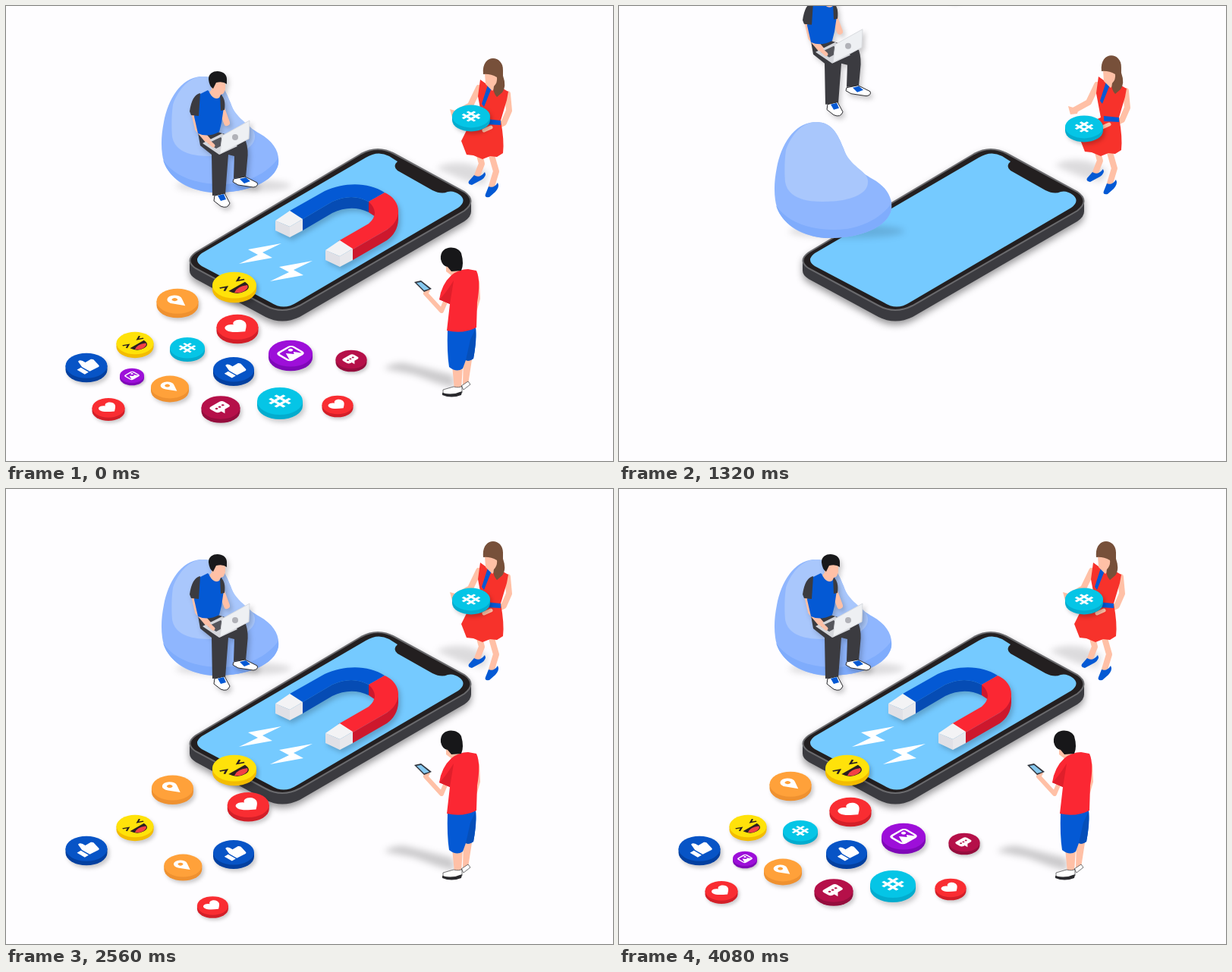
Recreate the animation shown at these times as an HTML page. Size 800 by 600 pixels, loop 4120 ms.

```html
<!DOCTYPE html>
<html lang="en">
<head>
<meta charset="utf-8">
<title>Social magnet</title>
<style>
html, body { margin: 0; width: 100%; height: 100%; overflow: hidden; background: #fefdff }
svg { display: block; width: 800px; height: 600px }
.lift { filter: drop-shadow(3px 4px 3px #0003) }
.soft { filter: blur(4px) }
.skin { fill: #ffc0a6 }
.blue { fill: #0459d4 }
.dark { fill: #3b3b40 }
.red { fill: #fb2733 }
.line { fill: none; stroke: #ffc0a6; stroke-linecap: round; stroke-linejoin: round }
</style>
</head>
<body>
<svg viewBox="0 0 800 600">
<g id="phone" style="filter:drop-shadow(0 5px 5px #0006)">
  <path class="dark" d="M242 335V349Q242 355 250 360L342 410Q364 421 387 410L604 284Q613 278 613 271V256Z"/>
  <path fill="#231f20" stroke="#6a6a6d" stroke-width="2" d="M250 325L468 195Q490 183 512 195L604 245Q621 257 604 270L387 395Q364 407 342 395L250 346Q235 336 250 325Z"/>
  <path fill="#75caff" d="M258 326L474 200Q490 190 505 198L516 205Q509 211 516 217L562 243Q574 249 582 245Q590 243 598 249Q608 257 596 266L383 391Q366 402 349 391L258 343Q246 335 258 326Z"/>
</g>
<g id="chair">
  <ellipse class="soft" cx="300" cy="237" rx="76" ry="9" fill="#0002"/>
  <path fill="#8fb6fe" d="M208 153C214 122 231 94 258 93C280 92 288 108 296 128C303 150 318 158 334 168C352 178 361 192 359 208C354 232 318 246 278 246C240 246 210 226 206 196C204 182 205 168 208 153Z"/>
  <path fill="#7facfc" d="M207 203C224 229 262 238 300 234C330 229 350 214 359 200V208C354 232 318 246 278 246C245 246 214 228 207 203Z"/>
  <path fill="#a9c7fc" d="M220 130C226 112 240 94 258 93C280 92 288 108 296 128C304 152 327 157 328 170C330 192 295 198 268 198C240 198 222 190 219 172C218 160 218 145 220 130Z"/>
</g>
<g id="bolt1" fill="#fff"><path id="zap" d="M363 313L319 321 332 328 307 340 351 332 338 325Z"/></g>
<g id="bolt2" fill="#fff"><use href="#zap" x="41" y="23"/></g>
<g id="magnet" class="lift">
  <path fill="#064cb4" d="M391 281L430 258Q456 246 478 258L487 269 478 272Q455 261 430 273L391 296Z"/>
  <path class="blue" d="M374 270L420 244C446 232 478 232 499 246L478 258Q456 246 430 258L391 281Z"/>
  <path fill="#cd182d" d="M478 258Q492 266 487 278L478 272ZM457 321L502 295Q517 284 517 266V282Q516 299 502 309L457 335Z"/>
  <path class="red" d="M478 258L499 246C523 257 522 282 502 295L457 321 438 310 478 287Q494 273 478 258Z"/>
  <g id="tip">
    <path fill="#f3f3f5" d="M355 283L374 270 391 281 374 291Z"/>
    <path fill="#e0e0e6" d="M355 283L374 291V305L355 296Z"/>
    <path fill="#e8e8ec" d="M374 291L391 281V296L374 305Z"/>
  </g>
  <use href="#tip" x="66" y="39"/>
</g>
<g id="coins"></g>
<g id="sitter" class="lift">
  <path class="dark" d="M253 167L279 166 316 178Q320 190 318 204L316 226 300 227 301 198 293 196 291 222 289 249 272 250 271 196 256 184Z"/>
  <path fill="#fff" stroke="#2a2a2e" d="M275 250L288 247 295 260Q292 268 283 264L274 257ZM300 228L315 225 331 233Q333 238 326 239L306 236 299 232Z"/>
  <path class="blue" d="M279 250L287 248 290 255 283 257ZM308 228L316 226 322 231 314 234Z"/>
  <path class="line" stroke-width="8" d="M248 140L253 162 270 182M284 135L291 154"/>
  <path class="blue" d="M250 119L266 111Q276 124 284 114L287 134 284 154 281 166Q266 174 253 168L248 146Z"/>
  <path class="dark" d="M256 115Q245 117 242 139L244 144 254 145ZM282 116Q290 121 288 137L283 138Z"/>
  <path class="skin" d="M271 98H289V109Q288 116 283 117L281 121Q274 125 268 114L271 110Z"/>
  <path fill="#19191b" d="M267 97C266 82 291 83 291 96V103Q286 99 277 101L273 109Q268 106 267 97Z"/>
  <path fill="#d4d6db" d="M259 181L285 168 305 185 281 196Z"/>
  <path fill="#55565c" d="M266 181L283 173 290 181 277 188Z"/>
  <path class="line" stroke-width="5" d="M263 175L273 184"/>
  <path fill="#eef0f3" stroke="#d8dade" d="M285 171L321 151 320 175 282 195Z"/>
  <circle cx="302" cy="173" r="4" fill="#b1b2b8"/>
</g>
<g id="woman">
  <path class="soft" fill="#0002" d="M567 214Q585 203 613 209L636 220 630 236 604 230Z"/>
  <path class="line" stroke-width="8" d="M624 197L627 208 620 226M640 197L646 218 640 238"/>
  <path class="blue" d="M617 223Q624 228 631 219Q634 224 627 229L614 236Q608 235 610 231ZM636 238Q643 241 648 233Q651 238 645 245L637 252Q630 253 632 248Z"/>
  <path class="line" stroke-width="8" d="M623 108L612 131 592 142M661 116L663 138 656 154 640 161"/>
  <path class="skin" d="M585 136L592 138 600 135 597 146 588 147Z"/>
  <path fill="#f7322b" d="M625 97L636 105 650 106 662 113 660 124 652 151Q657 178 655 194L647 199 638 198 628 202 616 197 607 196 600 178 609 160 628 151 622 119Z"/>
  <path class="blue" d="M635 104L640 108 630 133 627 129ZM632 149L652 151V157L632 156Z"/>
  <path class="skin" d="M631 88H648V104L641 112 632 103Z"/>
  <path fill="#77503a" d="M629 90C626 62 656 64 655 85L655 92Q660 106 654 114L647 120Q641 113 643 106Q648 101 647 94Q638 89 629 90Z"/>
  <path class="line" stroke-width="5" d="M639 160L630 164"/>
</g>
<g id="held"></g>
<g id="man">
  <path class="soft" fill="#0003" d="M498 478Q516 466 535 473L590 487 592 504 570 498 538 486Z"/>
  <path class="skin" d="M588 474H602L600 506H591ZM603 460H615L609 499H602Z"/>
  <path fill="#fff" stroke="#38383c" stroke-width=".7" d="M576 506L590 502Q598 504 601 501L601 510 590 514 576 511ZM600 501L609 495 612 499 603 506Z"/>
  <path fill="#29292d" d="M575 510Q588 514 601 508L600 513Q587 518 575 513Z"/>
  <path class="blue" d="M582 426L619 424Q621 438 616 465Q611 469 606 467L602 478Q594 484 584 476Q581 457 582 426Z"/>
  <path fill="#064fb9" d="M612 440L606 467Q611 469 616 465Q620 445 619 425Z"/>
  <path class="line" stroke-width="6" d="M621 364L622 386 618 400M579 390L574 402 553 379"/>
  <path class="skin" d="M580 335L598 342 600 354 588 356 580 350ZM544 369L552 367 559 375 555 382Z"/>
  <path fill="#30343d" d="M538 364L547 362 561 373 551 377Z"/>
  <path fill="#86c8ef" d="M541 365L547 364 558 373 551 375Z"/>
  <path class="red" d="M587 355Q597 347 609 347L620 349Q626 362 621 391L620 424Q602 433 581 428L585 393 571 387Q574 367 587 355Z"/>
  <path fill="#e01f2b" d="M590 362L585 393 571 387Q578 381 590 362Z"/>
  <path fill="#171719" d="M573 334C571 315 595 315 600 326Q604 340 600 349L587 350 582 344Q575 343 573 334Z"/>
</g>
</svg>
<script>
const LOOP = 4120, START = 840, SPAN = 480, FPS_STEP = 40;
const $ = id => document.getElementById(id);

// Coin faces are drawn flat, then laid on the isometric plane.
const kinds = {
  thumb: ['#0754c6', '#0340a0', '<path d="M-15-2h7v14h-7zM-6-2L-1-14Q5-16 4-6L14-6Q17-4 15 0L12 10Q11 13 8 13L-6 12Z"/>'],
  pin: ['#ffa13a', '#ef9130', '<path fill-rule="evenodd" d="M0 14L-8 0A9.5 9.5 0 1 1 8 0ZM-3.5-5a3.5 3.5 0 1 0 7 0a3.5 3.5 0 1 0-7 0Z"/>'],
  heart: ['#f92d32', '#d31f28', '<path d="M0 14C-8 8-15 3-15-4C-15-13-4-15 0-7C4-15 15-13 15-4C15 3 8 8 0 14Z"/>'],
  hash: ['#05c5e6', '#03acce', '<path fill="none" stroke="#fff" stroke-width="4" d="M-4.5-12V12M4.5-12V12M-12-4.5H12M-12 4.5H12"/>'],
  chat: ['#b51049', '#950d3d', '<path d="M-8-11H8Q13-11 13-6V2Q13 7 8 7H1L-6 14V7H-8Q-13 7-13 2V-6Q-13-11-8-11Z"/><path stroke="#b51049" stroke-width="4" stroke-linecap="round" d="M-6-2h0M0-2h0M6-2h0"/>'],
  photo: ['#9d0fd9', '#7f08b8', '<rect x="-12" y="-11" width="24" height="22" rx="4" fill="none" stroke="#fff" stroke-width="3.2"/><path d="M-11 10L-4-4 2 4 5 0 11 10Z"/><circle cx="5" cy="-5" r="2.8"/>'],
  smile: ['#ffe20a', '#f3bc00', '<path fill="none" stroke="#2b2020" stroke-width="2.5" d="M-17-8L-9-4-17 0M17-8L9-4 17 0"/><path fill="#2b2020" d="M-14 4H14Q13 18 0 18T-14 4Z"/><path fill="#f34045" d="M-11 11Q0 4 11 11Q8 17 0 17T-11 11Z"/>']
};
const coinArt = (kind, width) => {
  const [top, side, icon] = kinds[kind];
  return `<g class="lift" transform="scale(${width / 60})">
    <path fill="${side}" d="M-30-3v6a30 18 0 0 0 60 0v-6z"/><ellipse cy="-3" rx="30" ry="18" fill="${top}"/>
    <g fill="#fff" transform="translate(0 -3) matrix(.8 -.46 .8 .46 0 0)">${icon}</g></g>`;
};

// kind, x, y, width, start time
const coins = [
  ['thumb', 106, 477, 55, 1405], ['smile', 301, 371, 58, 1790], ['smile', 170, 447, 49, 1900],
  ['thumb', 300, 482, 54, 2010], ['heart', 305, 426, 55, 2166], ['pin', 216, 505, 50, 2198],
  ['pin', 226, 392, 55, 2392], ['heart', 437, 528, 41, 2471], ['photo', 375, 461, 58, 2600],
  ['heart', 135, 532, 43, 2683], ['chat', 283, 532, 51, 2832], ['photo', 166, 489, 32, 2945],
  ['chat', 455, 468, 41, 2990], ['hash', 361, 524, 60, 3064], ['hash', 239, 453, 46, 3200]
];
const from = { x: -60, y: 599 };
$('coins').innerHTML = coins.map(([kind, , , width]) => `<g>${coinArt(kind, width)}</g>`).join('');
$('held').innerHTML = `<g transform="translate(613 148)">${coinArt('hash', 50)}</g>`;

const easeOut = p => 1 - (1 - p) ** 3;
const backOut = p => 1 + 2.70158 * (p - 1) ** 3 + 1.70158 * (p - 1) ** 2;

// id, starting offset, start time, easing
const slides = [
  ['phone', 0, 405, 840, easeOut], ['woman', 280, -160, 980, easeOut], ['held', 0, -170, 987, backOut],
  ['chair', 0, 512, 1075, easeOut], ['sitter', 0, -280, 1248, backOut],
  ['magnet', 0, -350, 1366, backOut], ['man', 320, 190, 1422, easeOut]
];
const bolts = [['bolt1', 335, 326, 1745], ['bolt2', 376, 349, 1850]];

function draw(now) {
  let t = Math.floor(now % LOOP / FPS_STEP) * FPS_STEP;
  if (t < START) t = LOOP;
  const progress = start => Math.min(1, Math.max(0, (t - start) / SPAN));
  const move = (el, x, y) => el.setAttribute('transform', `translate(${x} ${y})`);

  for (const [id, dx, dy, start, ease] of slides) {
    const left = 1 - ease(progress(start));
    move($(id), dx * left, dy * left);
  }
  for (const [id, x, y, start] of bolts) {
    const s = Math.max(0, backOut(progress(start)));
    $(id).setAttribute('transform', `translate(${x} ${y}) scale(${s}) translate(${-x} ${-y})`);
  }
  coins.forEach(([, x, y, , start], i) => {
    const k = backOut(progress(start));
    move($('coins').children[i], from.x + (x - from.x) * k, from.y + (y - from.y) * k);
  });
}

const began = performance.now();
(function tick() {
  draw(performance.now() - began);
  requestAnimationFrame(tick);
})();
</script>
</body>
</html>
```
